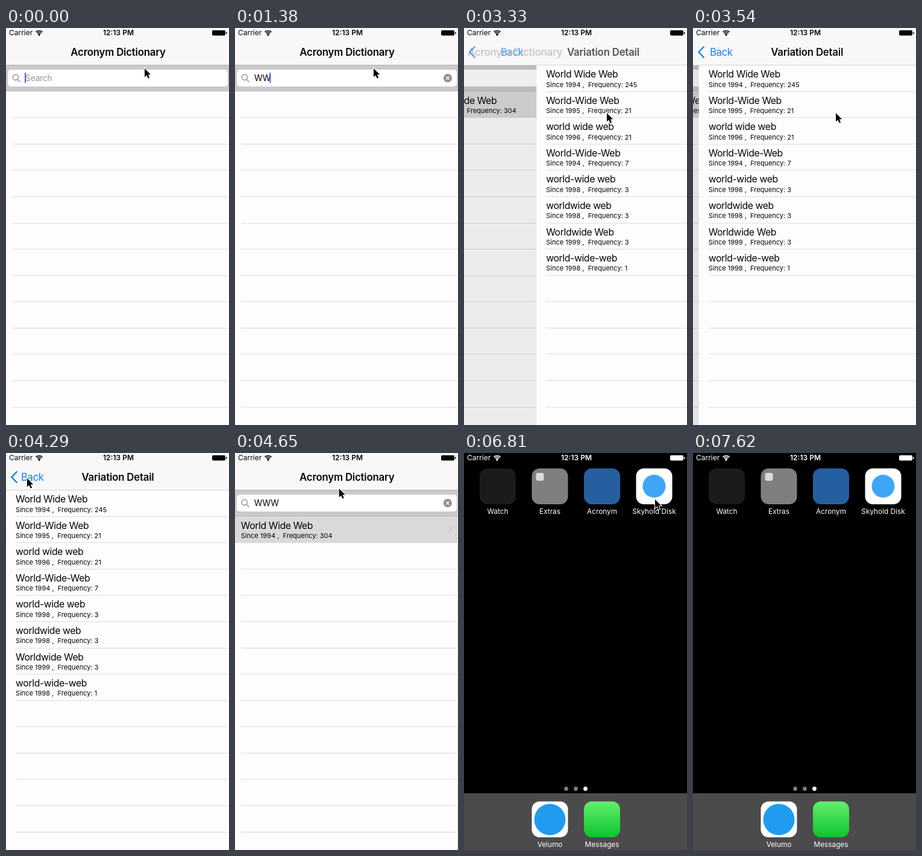
An HTML page with a canvas for the animation above (7.65 s loop, 370 px wide and 658 px high).

```html
<!DOCTYPE html>
<html lang="en">
<head>
<meta charset="utf-8">
<title>Acronym Dictionary</title>
<style>
html, body { margin: 0; width: 100%; height: 100%; overflow: hidden; background: #000; }
canvas { display: block; width: 370px; height: 658px; }
</style>
</head>
<body>
<canvas id="stage" width="370" height="658"></canvas>
<script>
const W = 370, H = 658, LOOP = 7650, ROW = 43.57, NAV = 61.2;
const c = document.getElementById('stage').getContext('2d');
const PAPER = '#fdfdfd', BAR = '#f8f8f8', GREY = '#c9c9ce', LINE = '#dddde0';
const INK = '#050505', BLUE = '#0f80f5', LIGHT = '#fff';

// Times of the events in ms
const TYPED = [1170, 1380, 1590], SEARCH = 2490, FOUND = 2880, PICK = 3178,
  BACK = 4290, CLEAR = 5250, HOME = 6240, HOME_END = 6680;

const VARIATIONS = [
  ['World Wide Web', 1994, 245], ['World-Wide Web', 1995, 21],
  ['world wide web', 1996, 21], ['World-Wide-Web', 1994, 7],
  ['world-wide web', 1998, 3], ['worldwide web', 1998, 3],
  ['Worldwide Web', 1999, 3], ['world-wide-web', 1998, 1]
];

// Pointer moves: start, end, from, to
const MOVES = [
  [2850, 3120, 230, 67, 237, 141],
  [3600, 4050, 237, 141, 35, 42],
  [4350, 5010, 35, 42, 352, 81],
  [6450, 6780, 352, 81, 317, 77],
  [6840, 7560, 317, 77, 338, 606]
];

const lerp = (a, b, p) => a + (b - a) * p;
const clamp = v => Math.max(0, Math.min(1, v));
const smooth = p => (p = clamp(p), p * p * (3 - 2 * p));
const spring = x => x <= 0 ? 0 : 1 - Math.exp(-x) * (1 + x);

function rect(x, y, w, h, color) {
  c.fillStyle = color;
  c.fillRect(x, y, w, h);
}
function round(x, y, w, h, r, color) {
  c.fillStyle = color;
  c.beginPath();
  c.roundRect(x, y, w, h, r);
  c.fill();
}
function disc(x, y, r, color) {
  c.fillStyle = color;
  c.beginPath();
  c.arc(x, y, r, 0, 7);
  c.fill();
}
function stroke(color, width, path) {
  c.strokeStyle = color;
  c.lineWidth = width;
  c.stroke(new Path2D(path));
}
function text(s, x, y, size, color, { weight = 400, align = 'left', track = 0 } = {}) {
  c.font = `${weight} ${size}px Inter, sans-serif`;
  c.letterSpacing = track + 'px';
  c.textAlign = align;
  c.fillStyle = color;
  c.fillText(s, x, y);
}
function layer(alpha, draw) {
  c.save();
  c.globalAlpha *= alpha;
  draw();
  c.restore();
}

function statusBar(color) {
  text('Carrier', 5, 12.3, 12, color);
  text('12:13 PM', 186.5, 12.3, 12, color, { weight: 600, align: 'center' });
  c.strokeStyle = color;
  c.lineWidth = 1.7;
  for (const r of [2.6, 5.3, 8]) {
    c.beginPath();
    c.arc(55, 12.5, r, -2.33, -0.81);
    c.stroke();
  }
  disc(55, 11.8, 1.3, color);
  round(342, 3.8, 22, 8.8, 2, color);
  round(365, 6.4, 1.6, 3.6, 1, color);
}

function separators(first, inset) {
  for (let i = first; i < 14; i++) rect(inset, Math.round(NAV + ROW * i), W, 1, LINE);
}

function entry(x, top, [name, year, count]) {
  text(name, x, top + 21, 15.8, INK, { track: -0.4 });
  text(`Since ${year} ,  Frequency: ${count}`, x, top + 36.3, 11, INK);
}

function caretAlpha(t) {
  if (t >= SEARCH && t < CLEAR) return 0;
  const started = [0, ...TYPED, CLEAR].filter(k => k <= t).pop();
  const phase = (t - started) % 1000;
  return 1 - smooth((phase - 450) / 100) + smooth((phase - 930) / 70);
}

function searchBar(t) {
  const query = t < CLEAR ? 'W'.repeat(TYPED.filter(k => k <= t).length) : '';
  rect(0, 62, W, 43, GREY);
  rect(0, 104, W, 1, '#b8b8bc');
  round(3, 69, 365, 28, 5, LIGHT);
  stroke('#7c7c82', 1.2, 'M20.5 81.8a4.6 4.6 0 1 0-9.2 0a4.6 4.6 0 1 0 9.2 0M19.2 85.2l4.3 4.3');
  if (query) {
    text(query, 32, 88, 13.8, INK, { track: -0.2 });
    disc(353, 83, 7, '#8e8e93');
    stroke(LIGHT, 1.4, 'M350.3 80.3l5.4 5.4m0-5.4l-5.4 5.4');
  } else {
    text('Search', 32, 88, 13.8, '#97979c', { track: -0.2 });
  }
  layer(caretAlpha(t), () => rect(31 + query.length * 13.2, 74, 2, 17, '#3f69e8'));
}

function spinner(t) {
  round(147, 290.5, 77, 76.5, 10, 'rgba(0,0,0,.8)');
  const head = Math.floor((t - 2610) / 1000 * 12);
  c.save();
  c.translate(185.5, 328.5);
  for (let i = 0; i < 12; i++) {
    const age = ((head - i) % 12 + 12) % 12;
    c.save();
    c.rotate(i * Math.PI / 6);
    round(-1.5, -17.5, 3, 8.5, 1.5, `rgba(255,255,255,${Math.max(0.3, 1 - age * 0.1)})`);
    c.restore();
  }
  c.restore();
}

function listPage(t) {
  rect(0, NAV, W, H, PAPER);
  separators(2, 10);
  searchBar(t);
  if (t >= FOUND && t < CLEAR) {
    if (t >= PICK) rect(0, 105, W, 44, '#d9d9d9');
    entry(10, 105, ['World Wide Web', 1994, 304]);
    stroke('#c7c7cc', 1.5, 'M354.5 121.5l4.5 5l-4.5 5');
  }
  if (t >= SEARCH && t < FOUND) spinner(t);
}

function detailPage() {
  rect(0, NAV, W, H, PAPER);
  separators(1, 16);
  VARIATIONS.forEach((v, i) => entry(16, NAV + ROW * i, v));
}

function app(t) {
  const p = t < BACK ? spring((t - PICK) * 0.0152) : 1 - spring((t - BACK) * 0.024);
  const title = { weight: 600, align: 'center', track: -0.2 };
  c.save();
  c.translate(-0.3 * W * p, 0);
  listPage(t);
  c.restore();
  if (p > 0.001) {
    rect(0, NAV, W, H, `rgba(0,0,0,${0.1 * p})`);
    c.save();
    c.translate(W * (1 - p), 0);
    detailPage();
    c.restore();
  }
  rect(0, 0, W, 62, BAR);
  rect(0, 61, W, 1, p > 0.5 ? '#d4d4d6' : '#b2b2b4');
  statusBar(INK);
  layer(clamp(1 - p * 1.2), () => text('Acronym Dictionary', 186 - 150 * p, 45.8, 16.8, INK, title));
  layer(p, () => {
    text('Variation Detail', 185.5 + 140 * (1 - p), 45.8, 16.8, INK, title);
    text('Back', 25 + 110 * (1 - p), 45.8, 16.8, BLUE, { track: -0.4 });
    stroke(BLUE, 2.4, 'M18.5 30.5L9.5 40L18.5 49.5');
  });
}

function icon(col, y, label, color) {
  const x = 26 + 86.5 * col;
  round(x, y, 60, 59.5, 13, color);
  text(label, x + 30, y + 75.5, 11.8, LIGHT, { align: 'center' });
}

function home() {
  icon(0, 25.5, 'Watch', '#1b1b1c');
  icon(1, 25.5, 'Extras', '#7f7f7f');
  round(119.5, 33, 13, 13, 3, '#d6dbdc');
  icon(2, 25.5, 'Acronym', '#265f9f');
  icon(3, 25.5, 'Skyhold Disk', LIGHT);
  disc(315.5, 55, 19, '#3fa6f6');
  [169.5, 185.5, 201.5].forEach((x, i) => disc(x, 556.5, 3.4, i < 2 ? '#7c7c7c' : LIGHT));
  rect(0, 564, W, 94, '#4b4b4b');
  icon(1, 577.5, 'Velumo', LIGHT);
  disc(142.5, 607.5, 26, '#1f9cf0');
  const green = c.createLinearGradient(0, 578, 0, 637);
  green.addColorStop(0, '#62ee6c');
  green.addColorStop(1, '#0cc42c');
  icon(2, 577.5, 'Messages', green);
}

// The app window shrinks into its icon while the home screen zooms in around it
function closing(t) {
  const p = smooth((t - HOME) / (HOME_END - HOME));
  const x = 199 * p, y = 25.5 * p, w = lerp(W, 60, p), h = lerp(H, 59.5, p), zoom = w / 60;
  layer(p, () => {
    c.translate(x, y);
    c.scale(zoom, zoom);
    c.translate(-199, -25.5);
    home();
  });
  layer(1 - p, () => {
    c.beginPath();
    c.roundRect(x, y, w, h, 13 * p);
    c.clip();
    c.translate(x, y);
    c.scale(w / W, h / H);
    app(t);
  });
  layer(p, () => statusBar(LIGHT));
}

function pointer(t) {
  if (t >= 7580) return;
  let [, , x, y] = MOVES[0];
  for (const [start, end, x0, y0, x1, y1] of MOVES) {
    if (t < start) break;
    const p = smooth((t - start) / (end - start));
    x = lerp(x0, x1, p);
    y = lerp(y0, y1, p);
  }
  c.save();
  c.translate(x, y);
  const arrow = 'M0 0V14.2L3.3 11.2L5.7 16.6L8.2 15.5L5.8 10.3H10.2Z';
  stroke(LIGHT, 2, arrow);
  c.fillStyle = '#000';
  c.fill(new Path2D(arrow));
  c.restore();
}

function frame(now) {
  const t = now % LOOP;
  rect(0, 0, W, H, '#000');
  if (t < HOME) {
    app(t);
  } else if (t < HOME_END) {
    closing(t);
  } else {
    home();
    statusBar(LIGHT);
  }
  pointer(t);
}

const began = performance.now();
function tick() {
  frame(performance.now() - began);
  requestAnimationFrame(tick);
}
tick();
</script>
</body>
</html>
```
